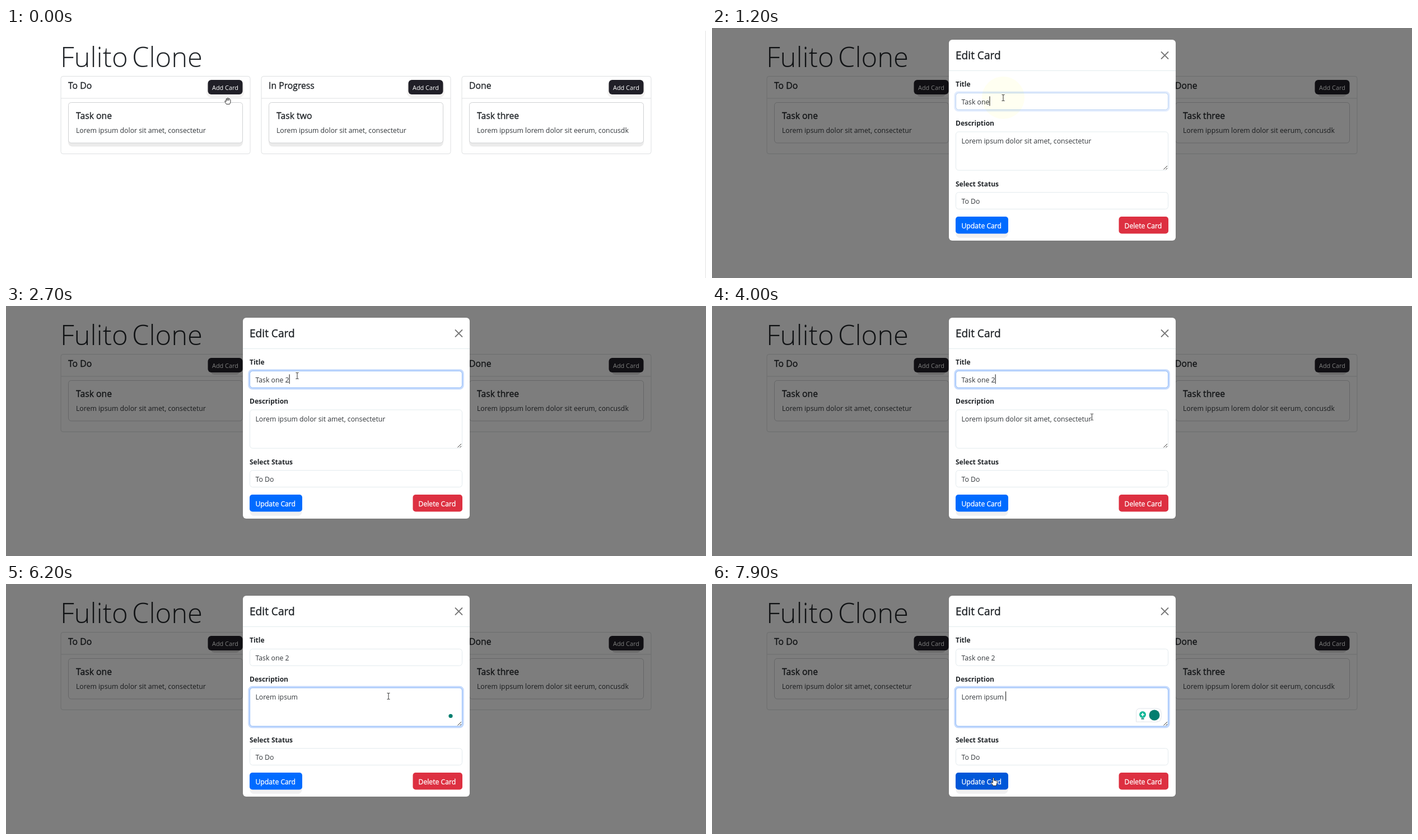
Recreate the animation shown at these times as an HTML page. Size 1250 by 448 pixels, loop 8 s.

```html
<!DOCTYPE html>
<html lang="en">
<head>
<meta charset="utf-8">
<title>Task board</title>
<style>
  html, body { margin: 0; width: 100%; height: 100%; overflow: hidden; background: #fff; }
  svg { display: block; width: 1250px; height: 448px; font: 12.27px "Open Sans", "Noto Sans", sans-serif; fill: #212529; }
  text { white-space: pre; }
  .display { font-size: 49px; font-weight: 300; }
  .head { font-size: 15.75px; stroke: #212529; stroke-width: .35; }
  .modal-head { font-size: 19.1px; stroke: #212529; stroke-width: .4; }
  .label { font-size: 12px; font-weight: 700; }
  .body { fill: #33373b; }
  .add { font-size: 10.9px; fill: #fff; }
  .btn { font-size: 12.2px; fill: #fff; stroke: #fff; stroke-width: .3; }
  .hint { font-size: 9.8px; font-weight: 600; fill: #f4f4f4; }
  .frame { fill: #fff; stroke: #dee0e2; }
  .card { fill: #fff; stroke: #cfd1d3; }
  .field { fill: #fff; stroke: #e3ebee; }
  .ring { fill: none; stroke: #c6dbfd; stroke-width: 3.5; }
  .edge { fill: none; stroke: #8fbafa; }
  .line { fill: none; stroke: #333; }
  .caret { fill: #111; }
  .pointer { fill: #fff; stroke: #222; stroke-width: .9; stroke-linejoin: round; }
  .halo { fill: #ff0; mix-blend-mode: multiply; }
</style>
</head>
<body>
<svg viewBox="0 0 1250 448" xml:space="preserve">
  <defs>
    <g id="column">
      <rect class="frame" x="98" y="86.5" width="338" height="139" rx="4"/>
      <path class="frame" d="M98 126H436"/>
    </g>
    <rect id="card" class="card" x="111.5" y="133.5" width="311" height="72.5" rx="5"/>
    <rect id="addButton" x="360.5" y="93" width="62" height="26" rx="6" fill="#201f27"/>
  </defs>

  <text class="display" y="70"><tspan x="97">Fulito</tspan><tspan x="225">Clone</tspan></text>
  <g id="board"></g>
  <path id="scrollEdge" d="M1249.5 5V448" stroke="#e2e2e2"/>

  <g id="dialog">
    <rect width="1250" height="448" opacity=".51" fill="#000"/>
    <rect x="423" y="21" width="405" height="360" rx="6" fill="#fff"/>
    <path d="M423 76.5H828" stroke="#e2ebee"/>
    <text class="modal-head" x="435" y="55.5">Edit Card</text>
    <path d="M802.5 43l12 12m0-12l-12 12" stroke="#777" stroke-width="1.8" stroke-linecap="round"/>

    <text class="label" x="435" y="104.5">Title</text>
    <rect class="field" x="435.5" y="116.5" width="379" height="30" rx="5"/>
    <g id="titleFocus">
      <rect class="ring" x="434" y="115" width="382" height="33" rx="6"/>
      <rect class="edge" x="435.5" y="116.5" width="379" height="30" rx="5"/>
    </g>
    <text class="body" id="titleText" x="445.5" y="136.5"></text>

    <text class="label" x="435" y="174.5">Description</text>
    <rect class="field" x="435.5" y="186" width="379" height="69" rx="5"/>
    <g id="noteFocus">
      <rect class="ring" x="434" y="184.5" width="382" height="72" rx="6"/>
      <rect class="edge" x="435.5" y="186" width="379" height="69" rx="5"/>
    </g>
    <path class="line" d="M806.5 253.5l6.5-6.5M810.5 253.5l2.5-2.5"/>
    <text class="body" id="noteText" x="445.5" y="206.5"></text>

    <text class="label" x="435" y="283.5">Select Status</text>
    <rect class="field" x="435.5" y="294.5" width="379" height="30" rx="5"/>
    <text class="body" x="445.5" y="315">To Do</text>

    <rect x="435.5" y="346" width="93" height="30" rx="7" fill="#f0f0f1"/>
    <rect id="update" x="435" y="338" width="94" height="30.5" rx="5"/>
    <text class="btn" x="445.5" y="358.5">Update Card</text>
    <rect x="726.5" y="338" width="88.5" height="30.5" rx="5" fill="#dd3041"/>
    <text class="btn" x="736.5" y="358.5">Delete Card</text>

    <circle id="dot" cx="794" cy="236.5" r="3.6" fill="#027e6f"/>
    <g id="helper">
      <path d="M757.5 247V230q0-7 7-7H794q8 0 8 8v8q0 8-8 8Z" fill="#fff" stroke="#e0e4ea"/>
      <circle cx="790" cy="235" r="9.5" fill="#027e6f"/>
      <circle cx="769" cy="234" r="6" fill="#12b898"/>
      <path d="M769 231v6m-3-3h6" stroke="#fff" stroke-width="1.7"/>
      <path d="M766.5 241.5h5" stroke="#027e6f" stroke-width="2"/>
    </g>

    <g id="hints">
      <rect x="516" y="155" width="137" height="95.5" rx="6" fill="#aaa" opacity=".5"/>
      <path d="M526 154l7-6 7 6Z" fill="#0f0f0f"/>
      <rect x="515.5" y="153" width="137.5" height="96" rx="6" fill="#0f0f0f"/>
      <text class="hint" x="525" y="175">Task one dvsddv</text>
      <text class="hint" x="525" y="204.5">Task one</text>
      <text class="hint" x="525" y="234">Task one dvsddv55</text>
    </g>
    <rect class="caret" id="titleCaret" y="122.5" width="1" height="17"/>
    <rect class="caret" id="noteCaret" y="192.5" width="1" height="17"/>
    <circle class="halo" id="halo" r="38"/>
  </g>

  <g id="cursor">
    <path id="arrow" class="pointer" d="M0 0V11.5L2.6 9.2 4.4 13 6 12.2 4.3 8.6H8Z"/>
    <path id="beam" class="line" d="M-2.5-5.5H-1Q0-5.5 0-4.5 0-5.5 1-5.5H2.5M0-4.5V4.5M-2.5 5.5H-1Q0 5.5 0 4.5 0 5.5 1 5.5H2.5"/>
    <path id="hand" class="pointer" d="M-2.5-6.2q1.1-1.3 2.2 0V-2l4.7 1.2q1.2.5 1 2L4.4 4.5 3.4 7.5H-2L-5 2.5q-.5-1.6.7-1.6L-2.5 2.2Z"/>
    <path id="grab" class="pointer" d="M-2.5 5.5L-5 1.2q-.7-1.8.9-1.6L-3 .9V-3.5q.2-1.4 1.4-1 .5-1.4 1.7-.6 1.3-.8 1.8.6 1.5-.5 1.7.9L4.9-2V2L3.4 5.5ZM-1.4-4.2V-1M.3-4.8V-1M2.1-4.3V-1"/>
  </g>
</svg>

<script>
const LOOP = 8000, STEP = 100;
const $ = id => document.getElementById(id);
const show = (id, on) => { $(id).style.opacity = +on; };
const within = (t, ...spans) => spans.some(([from, to]) => t >= from && t < to);

const columns = [
  ["To Do", "Task one", "Lorem ipsum dolor sit amet, consectetur"],
  ["In Progress", "Task two", "Lorem ipsum dolor sit amet, consectetur"],
  ["Done", "Task three", "Lorem ippsum lorem dolor sit eerum, concusdk"],
];
$("board").innerHTML = columns.map(([name, task, note], i) => `
  <g transform="translate(${i * 358})">
    <use href="#column"/>
    <g class="lift">
      <rect x="358" y="96" width="67" height="29" rx="9" fill="#f3f2f1"/>
      <rect x="111" y="180" width="312" height="32.5" rx="8" fill="#ebebeb"/>
    </g>
    <rect class="dim" x="366" y="110" width="51" height="13" rx="6" fill="#dcdcdc"/>
    <use href="#card"/><use href="#addButton"/>
    <text class="head" x="111" y="109">${name}</text>
    <text class="add" x="368" y="110.5">Add Card</text>
    <text class="head" x="125" y="162.5">${task}</text>
    <text class="body" x="125" y="187.5">${note}</text>
  </g>`).join("");

// Each row: start time, value
const titles = [[0, "Task one"], [2200, "Task one "], [2500, "Task one 2"]];
const notes = [
  [0, "Lorem ipsum dolor sit amet, consectetur"],
  [4800, "Lorem ipsum dolor sit amet, consectetur "],
  [5300, "Lorem ipsum dolor sit amet, "],
  [5400, "Lorem ipsum dolor sit "],
  [5800, "Lorem ipsum dolor "],
  [6200, "Lorem ipsum "],
];
const latest = (rows, t) => rows.filter(([at]) => at <= t).pop()[1];

const path = [
  [100, 470, 174], [200, 470, 174], [600, 527, 131], [800, 520, 125], [3100, 520, 125],
  [4100, 683, 201], [6800, 683, 201], [7700, 504, 354], [LOOP, 504, 354],
];
function cursorAt(t) {
  if (t < 100) return [396, 131];
  const i = path.findIndex(([at]) => at > t);
  const [t0, x0, y0] = path[i - 1], [t1, x1, y1] = path[i];
  const p = (t - t0) / (t1 - t0), e = p * p * (3 - 2 * p);
  return [x0 + (x1 - x0) * e, y0 + (y1 - y0) * e];
}
function cursorKind(t, x, y) {
  if (t < 100) return "grab";
  if (y > 338 && x < 528) return "hand";
  return within(y, [116, 147], [186, 255], [294, 325]) ? "beam" : "arrow";
}

const ramp = (t, from, length) => Math.min(1, Math.max(0, (t - from) / length));

function setField(name, text, caretOn) {
  const el = $(name + "Text");
  if (el.textContent !== text) el.textContent = text;
  $(name + "Caret").setAttribute("x", 445.5 + el.getComputedTextLength());
  show(name + "Caret", caretOn);
}

function draw(t) {
  const open = t >= 100;
  show("dialog", open);
  show("scrollEdge", !open);
  document.querySelectorAll(".lift").forEach(el => { el.style.opacity = +!open; });
  document.querySelectorAll(".dim").forEach(el => { el.style.opacity = +open; });

  setField("title", latest(titles, t), within(t, [1200, 1700], [2200, 3000], [3500, 4100], [4600, 4800]));
  setField("note", latest(notes, t), within(t, [4800, 6200], [6900, 7300], [7800, LOOP]));
  show("titleFocus", ramp(t, 1100, 200) - ramp(t, 4800, 200));
  show("noteFocus", ramp(t, 4800, 200));
  show("hints", within(t, [2200, 2500]));
  show("helper", within(t, [5000, 5300], [7100, LOOP]));
  show("dot", within(t, [5400, 7100]));

  const [x, y] = cursorAt(t), kind = cursorKind(t, x, y);
  $("cursor").setAttribute("transform", `translate(${x} ${y})`);
  for (const k of ["arrow", "beam", "hand", "grab"]) show(k, k === kind);
  $("update").setAttribute("fill", kind === "hand" ? "#0057d8" : "#006bff");

  const click = t < 3000 ? 1300 : 4800;
  $("halo").setAttribute("transform", `translate(${x} ${y})`);
  show("halo", .09 * Math.max(0, 1 - Math.abs(t - click) / 250));
}

const start = performance.now();
function tick() {
  const t = (performance.now() - start) % LOOP;
  draw(Math.floor(t / STEP) * STEP);
  requestAnimationFrame(tick);
}
tick();
</script>
</body>
</html>
```
